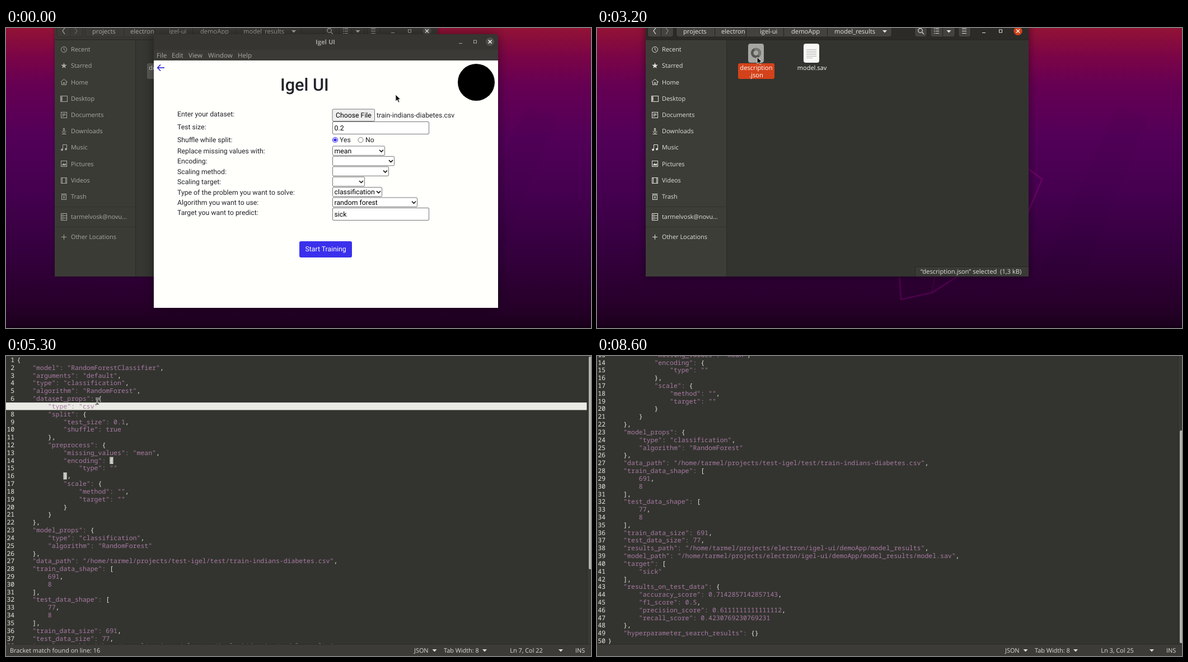
An HTML page with a canvas for the animation above (9.2 s loop, 1045 px wide and 536 px high).

```html
<!DOCTYPE html>
<html lang="en">
<head>
<meta charset="utf-8">
<title>Igel UI demo</title>
<style>
html, body { margin: 0; width: 100%; height: 100%; overflow: hidden; background: #33342f; }
canvas { display: block; width: 1045px; height: 536px; }
</style>
</head>
<body>
<canvas id="stage" width="1045" height="536"></canvas>
<script>
const W = 1045, H = 536, LOOP = 9200, STEP = 100;
const ctx = document.getElementById('stage').getContext('2d');
const UI = '"Open Sans", "Noto Sans", sans-serif';
const WEB = 'Roboto, Arial, sans-serif';
const MONO = '"Noto Sans Mono", "DejaVu Sans Mono", monospace';
const LINE = 13.82, CHAR = 6.9, CODE_X = 19.6, SCROLL = 175.1;

// Pointer path: time, x, y
const PATH = [
  [0, 696, 119], [100, 664, 113], [200, 638, 118], [500, 638, 118], [600, 660, 108],
  [700, 735, 74], [800, 840, 36], [900, 915, 20], [1000, 940, 17], [1100, 925, 20],
  [1400, 925, 20], [1500, 868, 22], [1600, 860, 23], [1700, 808, 19], [1800, 640, 82],
  [1900, 474, 138], [2400, 474, 138], [2500, 440, 116], [2700, 300, 48], [2800, 276, 36],
  [2900, 286, 52], [3200, 286, 52], [3900, 318, 108], [4000, 318, 108], [4100, 322, 116],
  [4600, 322, 116], [4900, 202, 81], [5000, 202, 81], [5300, 163, 81], [5700, 184, 29],
  [6000, 184, 29], [6400, 256, 199], [6800, 258, 199], [7100, 300, 330], [7400, 350, 380],
  [7800, 404, 165], [8100, 218, 68], [8400, 215, 70], [8500, 138, 29]
];

const CODE = `{
    "model": "RandomForestClassifier",
    "arguments": "default",
    "type": "classification",
    "algorithm": "RandomForest",
    "dataset_props": {
        "type": "csv",
        "split": {
            "test_size": 0.1,
            "shuffle": true
        },
        "preprocess": {
            "missing_values": "mean",
            "encoding": {
                "type": ""
            },
            "scale": {
                "method": "",
                "target": ""
            }
        }
    },
    "model_props": {
        "type": "classification",
        "algorithm": "RandomForest"
    },
    "data_path": "/home/tarmel/projects/test-igel/test/train-indians-diabetes.csv",
    "train_data_shape": [
        691,
        8
    ],
    "test_data_shape": [
        77,
        8
    ],
    "train_data_size": 691,
    "test_data_size": 77,
    "results_path": "/home/tarmel/projects/electron/igel-ui/demoApp/model_results",
    "model_path": "/home/tarmel/projects/electron/igel-ui/demoApp/model_results/model.sav",
    "target": [
        "sick"
    ],
    "results_on_test_data": {
        "accuracy_score": 0.7142857142857143,
        "f1_score": 0.5,
        "precision_score": 0.6111111111111112,
        "recall_score": 0.4230769230769231
    },
    "hyperparameter_search_results": {}
}`.split('\n');

function box(x, y, w, h, fill) {
  ctx.fillStyle = fill;
  ctx.fillRect(x, y, w, h);
}

function round(x, y, w, h, r, fill, stroke) {
  ctx.beginPath();
  ctx.roundRect(x, y, w, h, r);
  if (fill) { ctx.fillStyle = fill; ctx.fill(); }
  if (stroke) { ctx.strokeStyle = stroke; ctx.lineWidth = 1; ctx.stroke(); }
}

function disc(x, y, r, fill) {
  ctx.beginPath();
  ctx.arc(x, y, r, 0, 7);
  ctx.fillStyle = fill;
  ctx.fill();
}

function ring(x, y, r, color, width = 1) {
  ctx.beginPath();
  ctx.arc(x, y, r, 0, 7);
  ctx.strokeStyle = color;
  ctx.lineWidth = width;
  ctx.stroke();
}

function trace(points) {
  ctx.beginPath();
  for (let i = 0; i < points.length; i += 2) ctx.lineTo(points[i], points[i + 1]);
}

function line(points, color, width = 1, close = false) {
  trace(points);
  if (close) ctx.closePath();
  ctx.strokeStyle = color;
  ctx.lineWidth = width;
  ctx.stroke();
}

function poly(points, fill) {
  trace(points);
  ctx.fillStyle = fill;
  ctx.fill();
}

// Text by left edge (or align) and baseline
function text(s, x, y, size, color, family = UI, weight = 400, align = 'left') {
  ctx.font = `${weight} ${size}px ${family}`;
  ctx.textAlign = align;
  ctx.fillStyle = color;
  ctx.fillText(s, x, y);
}

function withShadow(blur, alpha, draw) {
  ctx.save();
  ctx.shadowColor = `rgba(0,0,0,${alpha})`;
  ctx.shadowBlur = blur;
  draw();
  ctx.restore();
}

function triangle(x, y, color) {
  poly([x - 4, y - 2, x + 4, y - 2, x, y + 2.5], color);
}

function windowButtons(x, y, gap, fg, closeFill) {
  line([x - 3, y + 3, x + 3, y + 3], fg);
  ctx.strokeStyle = fg;
  ctx.strokeRect(Math.round(x + gap) - 2.5, y - 2.5, 5, 5);
  const c = x + gap * 2 + 1;
  disc(c, y, 7.6, closeFill);
  line([c - 3, y - 3, c + 3, y + 3], '#fff', 1.3);
  line([c + 3, y - 3, c - 3, y + 3], '#fff', 1.3);
}

function wallpaper() {
  const g = ctx.createLinearGradient(0, 0, 0, H);
  [[0, '#921335'], [.09, '#7c0546'], [.19, '#660053'], [.37, '#520058'], [.56, '#44004e'],
   [.75, '#34003d'], [.93, '#260029'], [1, '#1a001c']].forEach(([p, c]) => g.addColorStop(p, c));
  box(0, 0, W, H, g);
  poly([930, 140, 985, 160, 870, 440, 790, 440], 'rgba(20,0,40,.03)');
  line([768, 250, 795, 270, 768, 334], 'rgba(128,8,112,.5)', 3);
  line([540, 440, 543, 485, 598, 473, 650, 440], 'rgba(105,5,100,.5)', 3);
  line([598, 473, 604, 440], 'rgba(105,5,100,.3)', 2);
  box(0, 533, W, 3, 'rgba(10,0,10,.45)');
}

const PLACES = ['Recent', 'Starred', 'Home', 'Desktop', 'Documents', 'Downloads', 'Music', 'Pictures', 'Videos', 'Trash'];

function placeIcon(i, row, c) {
  const x = 103.5, y = Math.floor(row) + .5;
  const frame = (w, h, dy = 0) => {
    ctx.strokeStyle = c;
    ctx.lineWidth = 1;
    ctx.strokeRect(x - w / 2, y + dy - h / 2, w, h);
  };
  const dashes = (ys, w) => { for (const d of ys) line([x - w, y + d, x + w, y + d], c); };
  if (i === 0) { ring(x, y, 5, c); line([x, y - 3, x, y, x + 2.5, y + 2], c); }
  if (i === 1) {
    const p = [];
    for (let k = 0; k < 10; k++) {
      const r = k % 2 ? 2.3 : 5.6, a = k * Math.PI / 5 - Math.PI / 2;
      p.push(x + r * Math.cos(a), y + r * Math.sin(a));
    }
    poly(p, c);
  }
  if (i === 2) line([x - 6, y, x, y - 5, x + 6, y, x + 4, y, x + 4, y + 5, x + 1, y + 5, x + 1, y + 1, x - 1, y + 1, x - 1, y + 5, x - 4, y + 5, x - 4, y], c);
  if (i === 3) { frame(12, 10); box(x - 5, y - 4, 2, 8, c); }
  if (i === 4) { frame(10, 10); dashes([-2, 0], 3); line([x - 3, y + 2, x, y + 2], c); }
  if (i === 5) { line([x - 1, y + 1, x - 1, y - 5, x + 1, y - 5, x + 1, y + 1], c); line([x - 4, y, x, y + 4, x + 4, y], c); dashes([5], 4); }
  if (i === 6) { line([x - 2, y + 4, x - 2, y - 5, x + 5, y - 5, x + 5, y + 3], c); disc(x - 3.5, y + 4, 1.9, c); disc(x + 3.5, y + 3, 1.9, c); }
  if (i === 7) { frame(10, 10); poly([x - 4, y + 3, x - 1, y - 1, x + 1, y + 1, x + 3, y - 1, x + 4, y + 3], c); }
  if (i === 8) { frame(10, 10); for (const d of [-3, 3]) line([x + d, y - 5, x + d, y + 5], c); }
  if (i === 9) { frame(8, 8, 1); dashes([-5], 5); for (const d of [-1, 1]) line([x + d, y - 1, x + d, y + 3], c); }
  if (i === 10) for (const d of [-4, 0, 4]) { frame(10, 4, d); line([x - 3, y + d, x - 1, y + d], c); }
  if (i === 11) { dashes([0], 4.5); line([x, y - 4.5, x, y + 4.5], c); }
}

function filesWindow(focus) {
  const fg = focus ? '#e2e1dc' : '#a9a8a2';
  const btn = focus ? '#43423e' : '#3b3a36', edge = focus ? '#232220' : '#2f2e2a';
  withShadow(focus ? 14 : 6, focus ? .5 : .3, () => box(87, -20, 684, 464, '#363732'));
  ctx.save();
  ctx.beginPath();
  ctx.rect(87, 0, 684, 444);
  ctx.clip();
  box(87, 0, 684, 21, focus ? '#2c2b28' : '#393834');
  box(87, 21, 144, 423, focus ? '#3d3d38' : '#3b3b36');
  box(231, 21, 540, 423, focus ? '#33342f' : '#363732');
  box(87, 20.5, 684, 1, '#24231f');
  box(231, 21, 1, 423, '#2b2b27');

  for (const [x, w] of [[90.5, 46], [141.5, 385], [567.5, 22], [595.5, 44], [645.5, 22]])
    round(x, -10, w, 26, 4, btn, edge);
  for (const x of [114, 210, 266, 333, 411, 617]) box(x, 0, 1, 15, edge);
  line([105, 0, 101, 5, 105, 11], fg, 1.2);
  line([123, 0, 127, 5, 123, 11], focus ? '#8a8983' : '#6d6c67', 1.2);
  [['projects', 154], ['electron', 222], ['igel-ui', 291], ['demoApp', 347], ['model_results', 424]]
    .forEach(([s, x]) => text(s, x, 9.6, 11.2, fg));
  triangle(514, 6, fg);
  triangle(628.5, 6, fg);
  ring(577.5, 4.5, 3.8, fg, 1.2);
  line([580.5, 7.5, 584, 11], fg, 1.3);
  for (const y of [1, 5, 9]) {
    box(602, y, 2, 1, fg);
    box(605, y, 6, 1, fg);
    box(652, y, 8, 1, fg);
  }
  windowButtons(691, 5.5, 30, fg, focus ? '#d4431b' : '#504f4b');

  PLACES.forEach((s, i) => {
    const y = 38.5 + i * 29.2;
    placeIcon(i, y, fg);
    text(s, 116, y + 3.7, 10.9, fg);
  });
  box(87, 319, 144, 1, '#32322e');
  box(87, 355, 144, 1, '#32322e');
  placeIcon(10, 337, fg);
  text('tarmelvosk@novu…', 116, 341, 10.9, fg);
  placeIcon(11, 373.5, fg);
  text('Other Locations', 116, 377, 10.9, fg);

  round(270, 28, 28, 34, 4, focus ? '#a6a6a2' : '#e3e3df');
  ring(284, 44.5, 6.8, focus ? '#555552' : '#6e6e6b', 4.6);
  ctx.beginPath();
  ctx.arc(284, 44.5, 6.8, -2, .8);
  ctx.strokeStyle = focus ? '#777774' : '#a2a2a0';
  ctx.lineWidth = 4;
  ctx.stroke();
  round(252, 63, 65, 28, 3, focus ? '#d3421a' : '#595954');
  const label = focus ? '#fff' : '#d6d5d0';
  text('description', 284.5, 74.5, 11.2, label, UI, 400, 'center');
  text('.json', 284.5, 87.6, 11.2, label, UI, 400, 'center');

  round(369, 28, 28, 34, 4, focus ? '#f8f8f6' : '#e3e3df');
  for (let y = 38; y < 54; y += 3) box(374, y, y > 50 ? 11 : 18, 1, '#b5b5b1');
  text('model.sav', 384, 74.5, 11, label, UI, 400, 'center');

  round(568.5, 426.5, 206, 22, 3, focus ? '#3a3a36' : '#393935', '#262622');
  text('“description.json” selected  (1,3 kB)', 578, 439.3, 11.2, fg);
  ctx.restore();
}

function field(x, y, w, h, value, arrow) {
  round(x + .5, y + .5, w - 1, h - 1, 1.5, '#fff', '#767676');
  text(value, x + 3.5, y + h / 2 + 4.3, 12.27, '#000', WEB);
  if (arrow) line([x + w - 10, y + h / 2 - 1.5, x + w - 6.5, y + h / 2 + 2, x + w - 3, y + h / 2 - 1.5], '#111', 1.6);
}

function appWindow() {
  withShadow(20, .45, () => round(264, 11, 615, 489, [5, 5, 0, 0], '#363531'));
  box(264, 39, 615, 19, '#3b3a36');
  box(264, 58, 615, 442, '#fffffc');
  text('Igel UI', 570.5, 29.2, 11.2, '#a09f99', UI, 700, 'center');
  windowButtons(812, 24.5, 25.8, '#a9a8a2', '#514f4b');
  [['File', 269], ['Edit', 296], ['View', 326], ['Window', 361], ['Help', 414]]
    .forEach(([s, x]) => text(s, x, 53, 11.6, '#a9a8a2'));

  line([283, 71, 271, 71], '#2a20d8', 1.6);
  line([276, 65.5, 270.7, 71, 276, 76.5], '#2a20d8', 1.6);
  text('Igel UI', 490, 111.5, 30.7, '#212529', WEB, 500);
  disc(840, 97, 33, '#000');

  const rows = [['Enter your dataset:', 153], ['Test size:', 176], ['Shuffle while split:', 199],
    ['Replace missing values with:', 219], ['Encoding:', 237.5], ['Scaling method:', 256],
    ['Scaling target:', 274.5], ['Type of the problem you want to solve:', 293],
    ['Algorithm you want to use:', 311.3], ['Target you want to predict:', 329.8]];
  for (const [s, y] of rows) text(s, 306, y + 4.5, 12.27, '#212529', WEB);

  round(583, 145, 75.5, 21.5, 2, '#efefef', '#767676');
  text('Choose File', 589, 160, 12.27, '#000', WEB);
  text('train-indians-diabetes.csv', 662, 160, 12.27, '#212529', WEB);
  field(583, 167, 173, 23, '0.2');
  ring(588, 200, 4.5, '#3a30e8', 1.2);
  disc(588, 200, 2.8, '#3a30e8');
  ring(633.5, 200, 4.5, '#767676');
  text('Yes', 596, 204, 12.27, '#212529', WEB);
  text('No', 642, 204, 12.27, '#212529', WEB);
  [[94, 'mean'], [111, ''], [101, ''], [58, ''], [89, 'classification'], [152, 'random forest']]
    .forEach(([w, s], i) => field(583, 210.5 + i * 18.4, w, 17.5, s, true));
  field(583, 321, 173, 23, 'sick');

  round(524, 381, 94, 29, 3, '#3a30ec');
  text('Start Training', 571, 399.4, 12.27, '#fff', WEB, 400, 'center');
}

function codeLine(s, y) {
  for (const m of s.matchAll(/"[^"]*":?|[\d.]+|true|[^\s"]/g)) {
    const plain = /^[{}\[\],]$/.test(m[0]);
    text(m[0], CODE_X + m.index * CHAR, y, 11.5, plain ? '#e8e8e3' : '#a87aa4', MONO);
  }
}

function overscroll(strength) {
  ctx.translate(510, 520);
  ctx.scale(1, .07);
  const g = ctx.createRadialGradient(0, 0, 0, 0, 0, 500);
  g.addColorStop(0, `rgba(90,90,84,${.4 * strength})`);
  g.addColorStop(.5, `rgba(70,70,65,${.3 * strength})`);
  g.addColorStop(1, 'rgba(60,60,56,0)');
  disc(0, 0, 500, g);
}

function editor(t) {
  const scroll = t >= 6700 ? SCROLL : 0;
  const current = t < 5300 ? 14 : t < 5800 ? 7 : 3;
  const matched = t < 5400;
  const top = n => (n - 1) * LINE - scroll + .2;
  box(0, 0, W, H, '#33342f');
  ctx.save();
  ctx.beginPath();
  ctx.rect(0, 0, W, 515);
  ctx.clip();
  if (!scroll) box(0, top(current), 1038, 13.4, '#eaebe4');
  if (matched) {
    box(CODE_X + 24 * CHAR, top(14) + .5, CHAR - .5, 12.6, '#bcbdb5');
    box(CODE_X + 12 * CHAR, top(16) + .5, CHAR - .5, 12.6, '#bcbdb5');
  }
  CODE.forEach((s, i) => {
    const y = top(i + 1) + 10.8;
    if (y < -4 || y > 530) return;
    text(i + 1, 15.2, y, 11.5, '#e8e8e3', MONO, 400, 'right');
    codeLine(s, y);
  });
  if (t >= 4400 && t < 4700) box(192, 182, 1, 8, '#fff');
  if (t >= 6700 && t < 7200) overscroll(1 - Math.max(0, t - 6800) / 400);
  ctx.restore();

  box(1038, 0, 7, 515, '#393934');
  box(1037.5, 0, 1, 515, '#2a2a26');
  round(1041, scroll ? 133 : 1, 5, 380, 2, '#b4b4ae');
  box(0, 515, W, 21, '#3c3b37');
  box(0, 514.5, W, 1, '#282824');
  const fg = '#dfded9', y = 530;
  if (matched) text('Bracket match found on line: 16', 7, y, 10.9, fg);
  text('JSON', 729, y, 10.9, fg);
  text('Tab Width: 8', 782, y, 10.9, fg);
  const col = { 14: 26, 7: 22, 3: 25 }[current];
  text(`Ln ${current}, Col ${col}`, 929.5, y, 10.9, fg, UI, 400, 'center');
  text('INS', 1017, y, 10.9, fg);
  for (const x of [765.5, 855, 991]) triangle(x, 526, fg);
}

function pointerAt(t) {
  let i = 0;
  while (i < PATH.length - 2 && PATH[i + 1][0] <= t) i++;
  const [t0, x0, y0] = PATH[i], [t1, x1, y1] = PATH[i + 1];
  const u = Math.min(1, (t - t0) / (t1 - t0)), k = u * u * (3 - 2 * u);
  return [x0 + (x1 - x0) * k, y0 + (y1 - y0) * k];
}

function pointer(t) {
  if (t >= 8600) return;
  const [x, y] = pointerAt(t);
  ctx.save();
  ctx.translate(x, y);
  if (t < 4100) {
    const arrow = [0, 0, 0, 12, 2.9, 9.4, 5, 14, 7, 13, 5, 8.8, 8.6, 8.4];
    poly(arrow, '#111');
    line(arrow, '#e8e8e8', .9, true);
  } else if (t >= 6700 && t < 6900) {
    const diamond = [0, -8, 8, 0, 0, 8, -8, 0];
    poly(diamond, '#222');
    line(diamond, '#eee', 1.2, true);
    line([-6, 0, 6, 0], '#eee');
    line([0, -6, 0, 6], '#eee');
    disc(0, 0, 1.6, '#eee');
  } else {
    for (const [c, w] of [['#eee', 2.8], ['#111', 1]]) {
      line([0, -5, 0, 5], c, w);
      line([-3, -5, 3, -5], c, w);
      line([-3, 5, 3, 5], c, w);
    }
  }
  ctx.restore();
}

function draw(t) {
  if (t < 4100) {
    wallpaper();
    filesWindow(t >= 3100);
    if (t < 1600) appWindow();
  } else editor(t);
  pointer(t);
}

ctx.textRendering = 'geometricPrecision';
const start = performance.now();
let last = -1;
function tick() {
  const t = Math.floor((performance.now() - start) % LOOP / STEP) * STEP;
  if (t !== last) draw(last = t);
  requestAnimationFrame(tick);
}
tick();
</script>
</body>
</html>
```
